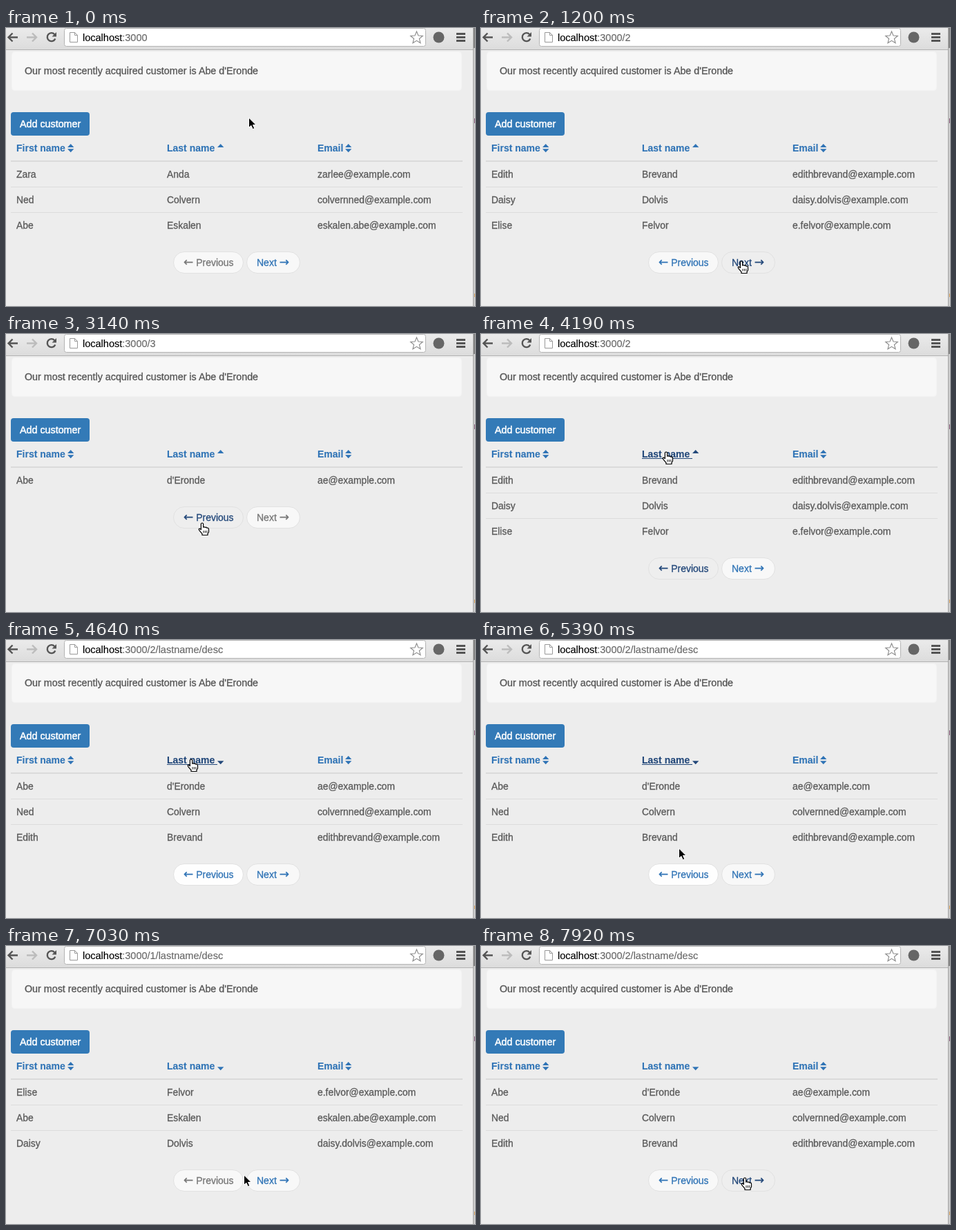
Recreate the animation shown at these times as an HTML page. Size 679 by 403 pixels, loop 8 s.

```html
<!DOCTYPE html>
<html>
<head>
<meta charset="utf-8">
<style>
  html, body { margin: 0; width: 100%; height: 100%; overflow: hidden; background: #ededed; }
  svg { display: block; width: 679px; height: 403px; font: 14px "Liberation Sans", Arial, sans-serif; }
  text { white-space: pre; stroke-width: .3px; }
  .bold { font-weight: bold; stroke-width: .1px; }
  .sign { font: 17px "DejaVu Sans", sans-serif; }
</style>
</head>
<body>
<svg viewBox="0 0 679 403">
  <defs>
    <linearGradient id="bar" x2="0" y2="1"><stop stop-color="#ebebeb"/><stop offset="1" stop-color="#dcdcdc"/></linearGradient>
    <g id="arrow">
      <path d="M-.5-1V13.5L2.9 10.4L5.3 15.6L7.8 14.5L5.5 9.5H10Z" fill="#000" stroke="#fff"/>
    </g>
    <g id="hand">
      <path d="M-1.6 1Q0-1 1.6 1V6Q3 5 4.2 6.5Q6 5.5 6.9 7.3Q9 6.5 9.5 9V13L8 15.5V17.5H0V15.5L-4 11Q-5.5 8.5-4 8.2Q-2.5 8.2-1.6 10Z" fill="#fff" stroke="#000" stroke-width="1.2"/>
      <path d="M2 11v3.5m2.4-3.5v3.5m2.4-3.5v3.5" stroke="#000" stroke-width=".9"/>
    </g>
    <path id="ban" d="M17 23a8 8 0 1 1-16 0a8 8 0 1 1 16 0M3.5 17.5L14.5 28.5" fill="none"/>
    <g id="no">
      <use href="#arrow"/>
      <use href="#ban" stroke="#fff" stroke-width="3.6"/>
      <use href="#ban" stroke="#999" stroke-width="1.8"/>
    </g>
  </defs>

  <!-- browser toolbar -->
  <rect width="676" height="31" fill="url(#bar)"/>
  <rect y="31" width="676" height="1" fill="#b2b2b2"/>
  <rect x="84.5" y=".5" width="523" height="26" rx="3" fill="#fff" stroke="#b4b4b4"/>
  <g fill="none" stroke="#555" stroke-width="2.4">
    <path d="M17 13.5H4M9.5 7.5L3.5 13.5L9.5 19.5"/>
    <path d="M30 13.5H43M38 7.5L44 13.5L38 19.5" stroke="#bcbcbc"/>
    <path d="M70.3 9.2A6 6 0 1 0 71.3 15.5"/>
    <path d="M652 8.5H665M652 13.5H665M652 18.5H665" stroke-width="3"/>
    <path d="M92.5 6.5H99.5L103.5 10.5V20.5H92.5ZM99.5 6.5V10.5H103.5" stroke="#999" stroke-width="1"/>
    <path d="M594.5 5L597 11L603.3 11.4L598.4 15.5L600 21.8L594.5 18.3L589 21.8L590.6 15.5L585.7 11.4L592 11Z" stroke="#8a8a8a" stroke-width="1.1"/>
  </g>
  <path d="M73 6V12.5H66.5Z" fill="#555"/>
  <circle cx="626.5" cy="13.5" r="8" fill="#666"/>
  <text x="111" y="19" font-size="14.5" stroke="#000" style="stroke-width:.15px">localhost<tspan id="url" fill="#666" stroke="#666"></tspan></text>

  <!-- window edge -->
  <rect x="676" width="1" height="403" fill="#a2a2a2"/>
  <rect x="677" width="2" height="403" fill="#cfcfcf"/>
  <rect x="677" width="2" height="29" fill="#858585"/>
  <rect x="678" y="131" width="1" height="7" fill="#805070"/>
  <rect x="678" y="385" width="1" height="5" fill="#d59a50"/>

  <!-- fixed page parts -->
  <rect x="8.5" y="34.5" width="651" height="56" rx="4" fill="#f7f7f7" stroke="#f3f3f3"/>
  <text x="27" y="67" font-size="14.3" fill="#555" stroke="#555">Our most recently acquired customer is Abe d'Eronde</text>
  <rect x="7" y="122" width="114" height="34" rx="4" fill="#337ab7"/>
  <text x="20" y="144" font-size="14.3" fill="#fff" stroke="#fff" style="stroke-width:.5px">Add customer</text>
  <rect x="7" y="192" width="654" height="2" fill="#dadada"/>
  <g id="page"></g>
  <use id="cursor"/>
</svg>
<script>
const LINK = '#3074b6', DARK = '#23487a', COLS = [15, 233, 451];
const $ = id => document.getElementById(id);

const zara = ['Zara', 'Anda', 'zarlee'], ned = ['Ned', 'Colvern', 'colvernned'],
  abe = ['Abe', 'Eskalen', 'eskalen.abe'], edith = ['Edith', 'Brevand', 'edithbrevand'],
  daisy = ['Daisy', 'Dolvis', 'daisy.dolvis'], elise = ['Elise', 'Felvor', 'e.felvor'],
  abe2 = ['Abe', "d'Eronde", 'ae'];

const up1 = { url: '', rows: [zara, ned, abe], prev: 0, next: 1 };
const up2 = { url: '/2', rows: [edith, daisy, elise], prev: 1, next: 1 };
const up3 = { url: '/3', rows: [abe2], prev: 1, next: 0 };
const down1 = { url: '/1/lastname/desc', rows: [elise, abe, daisy], prev: 0, next: 1, desc: 1 };
const down2 = { url: '/2/lastname/desc', rows: [abe2, ned, edith], prev: 1, next: 1, desc: 1 };

const pages = [[0, up1], [1200, up2], [2250, up3], [3440, up2], [4490, down2], [5980, down1], [7470, down2]];

// highlighted links: p previous, n next, l last name; w is a bright previous button
const marks = [[0, ''], [750, 'n'], [2250, ''], [2990, 'p'], [4190, 'pl'], [4490, 'lw'],
  [5540, 'lp'], [5980, ''], [7180, 'n']];

const moves = [
  [0, 352, 131, 'arrow'], [300, 354, 160, 'arrow'], [450, 362, 230, 'arrow'], [600, 370, 305, 'arrow'],
  [750, 377, 338, 'hand'], [2250, 377, 338, 'arrow'], [2400, 376, 340, 'arrow'], [2550, 365, 335, 'arrow'],
  [2700, 340, 318, 'arrow'], [2840, 312, 297, 'arrow'], [2990, 290, 279, 'hand'], [3140, 284, 274, 'hand'],
  [3440, 284, 273, 'arrow'], [3590, 283, 262, 'arrow'], [3740, 281, 240, 'arrow'], [3890, 277, 215, 'arrow'],
  [4040, 272, 192, 'arrow'], [4190, 268, 171, 'hand'], [4490, 268, 173, 'hand'], [4790, 268, 175, 'hand'],
  [5390, 287, 303, 'arrow'], [5540, 283, 325, 'hand'], [5680, 281, 335, 'hand'], [5980, 280, 335, 'no'],
  [6880, 300, 335, 'no'], [7030, 345, 333, 'arrow'], [7180, 381, 336, 'hand'], [7920, 382, 336, 'hand']
];

const at = (list, t) => list.findLast(item => item[0] <= t);
const text = (x, y, str, color, extra = '') =>
  `<text x="${x}" y="${y}" fill="${color}" stroke="${color}" ${extra}>${str}</text>`;
const sign = s => `<tspan class="sign">${s}</tspan>`;

function header(i, label, iconX, color, shape, line) {
  const up = `M${iconX} 173h9.4l-4.7-5z`, down = `M${iconX} 175.3h9.4l-4.7 5z`;
  return text(COLS[i], 179, label, color, 'class="bold"') +
    (line ? `<rect x="${COLS[i]}" y="180" width="73" height="1" fill="${color}"/>` : '') +
    `<path d="${shape == 'up' ? up : shape == 'down' ? down : up + down}" fill="${color}"/>`;
}

function pill(x, y, w, label, enabled, hot, bright) {
  const fill = hot ? '#eee' : bright ? '#fefefe' : '#f8f8f8';
  return `<rect x="${x + .5}" y="${y + .5}" width="${w - 1}" height="31" rx="15.5" fill="${fill}" stroke="#e1e1e1"/>` +
    text(x + 15, y + 21, label, !enabled ? '#777' : hot ? DARK : LINK);
}

function drawPage(page, mark) {
  const hot = c => mark.includes(c), y = 213 + 37 * page.rows.length;
  let out = header(0, 'First name', 89, LINK) +
    header(1, 'Last name', 306, hot('l') ? DARK : LINK, page.desc ? 'down' : 'up', hot('l')) +
    header(2, 'Email', 491, LINK);
  page.rows.forEach(([first, last, mail], i) => {
    [first, last, mail + '@example.com'].forEach((s, c) =>
      out += text(COLS[c], 217 + 37 * i, s, '#5a5a5a', 'font-size="13.9"'));
    if (i) out += `<rect x="7" y="${193 + 37 * i}" width="654" height="1" fill="#dcdcdc"/>`;
  });
  $('page').innerHTML = out +
    pill(242, y, 102, sign('←') + ' Previous', page.prev, hot('p'), hot('w')) +
    pill(348, y, 78, 'Next ' + sign('→'), page.next, hot('n'));
  $('url').textContent = ':3000' + page.url;
}

let shown;
function frame() {
  const t = performance.now() % 8000;
  const [pageTime, page] = at(pages, t), [markTime, mark] = at(marks, t), [, x, y, kind] = at(moves, t);
  const key = pageTime + '/' + markTime;
  if (key != shown) drawPage(page, mark);
  shown = key;
  $('cursor').setAttribute('href', '#' + kind);
  $('cursor').setAttribute('transform', `translate(${x} ${y})`);
  requestAnimationFrame(frame);
}
frame();
</script>
</body>
</html>
```
